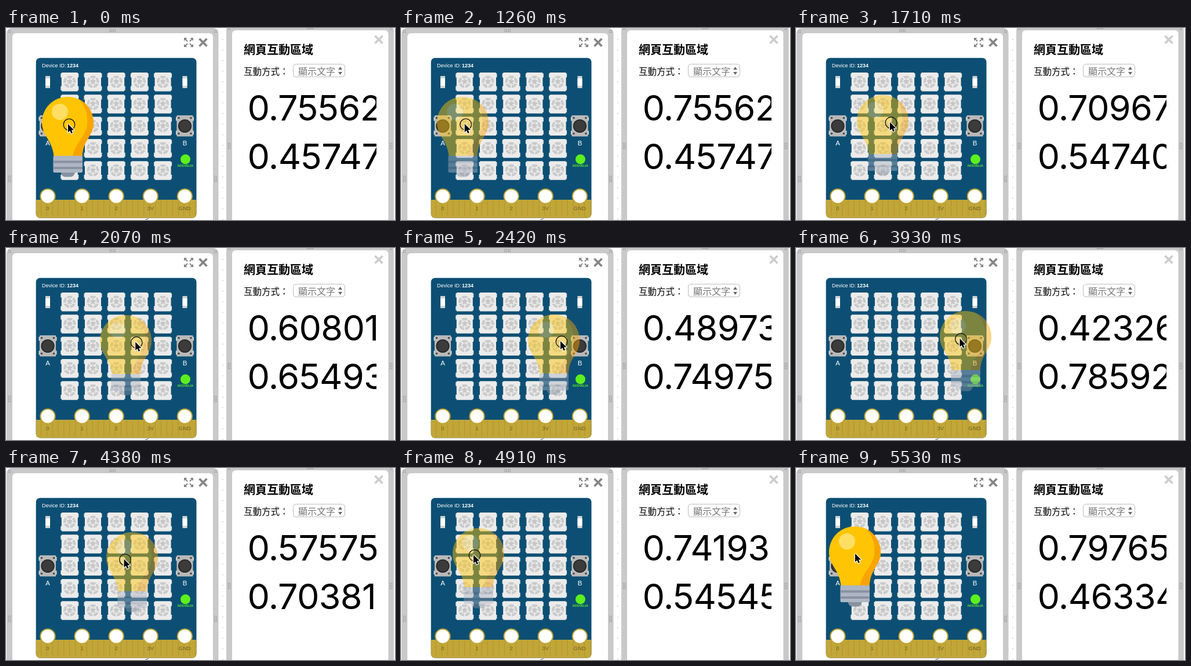
An HTML page with a canvas for the animation above (5710 ms loop, 671 by 332 pixels).

```html
<!DOCTYPE html>
<html lang="zh-Hant">
<head>
<meta charset="utf-8">
<title>Bulb drag</title>
<style>
html, body { margin: 0; width: 100%; height: 100%; overflow: hidden; background: #fff; }
canvas { display: block; }
</style>
</head>
<body>
<canvas id="stage" width="671" height="332"></canvas>
<script>
const W = 671, H = 332, LOOP = 5710, TICK = 89.3;
const BLUE = '#0d4f74', GOLD = '#c1a638', FRAME = '#c9c9c9';
const SANS = '"Liberation Sans", sans-serif';
const CJK = '"Noto Sans CJK TC", "Noto Sans CJK JP", "Noto Sans CJK", sans-serif';
const GRAB = [47, 48];

// Waypoints of the drag: tick, bulb x, bulb y, two 10-bit sensor levels
const PATH = [
  [14, 62, 119, 773, 468],
  [19, 105, 116, 726, 560],
  [27, 219, 115, 501, 767],
  [31, 252, 109, 425, 808],
  [43, 252, 109, 425, 808],
  [49, 173, 111, 589, 720],
  [55, 89, 104, 759, 558],
  [60, 57, 101, 816, 474]
];

function layer(w, h, paint) {
  const canvas = document.createElement('canvas');
  canvas.width = w;
  canvas.height = h;
  paint(canvas.getContext('2d'));
  return canvas;
}

function box(c, x, y, w, h, fill, r = 0) {
  c.fillStyle = fill;
  c.beginPath();
  c.roundRect(x, y, w, h, r);
  c.fill();
}

function disc(c, x, y, r, fill) {
  c.fillStyle = fill;
  c.beginPath();
  c.arc(x, y, r, 0, Math.PI * 2);
  c.fill();
}

function ring(c, x, y, r, color, width) {
  c.strokeStyle = color;
  c.lineWidth = width;
  c.beginPath();
  c.arc(x, y, r, 0, Math.PI * 2);
  c.stroke();
}

function line(c, points, color, width) {
  c.strokeStyle = color;
  c.lineWidth = width;
  c.beginPath();
  points.forEach(([x, y]) => c.lineTo(x, y));
  c.stroke();
}

function poly(c, points, fill) {
  c.fillStyle = fill;
  c.beginPath();
  points.forEach(([x, y]) => c.lineTo(x, y));
  c.closePath();
  c.fill();
}

function text(c, str, x, y, font, fill, align = 'left') {
  c.font = font;
  c.fillStyle = fill;
  c.textAlign = align;
  c.fillText(str, x, y);
}

// Calls fn with the signs of the four corners
function corners(fn) {
  for (const sx of [-1, 1])
    for (const sy of [-1, 1]) fn(sx, sy);
}

function grip(c, x, y, cols, rows) {
  for (let i = 0; i < cols; i++)
    for (let j = 0; j < rows; j++)
      box(c, x + (i - (cols - 1) / 2) * 3 - 0.75, y + (j - (rows - 1) / 2) * 3 - 0.75, 1.5, 1.5, '#8c8c8c');
}

function panel(c, x, y, w, side, midY) {
  box(c, x, y, w, 360, FRAME, 9);
  box(c, x + side, y + 9, w - side * 2 + 0.5, 360, '#fff', 6);
  grip(c, x + w / 2, y + 4.5, 4, 2);
  for (const gx of [x + 5, x + w - 5]) {
    grip(c, gx, midY, 2, 4);
    grip(c, gx, y + 6, 2, 2);
  }
}

function cross(c, x, y, color) {
  const r = 6.5;
  line(c, [[x - r, y - r], [x + r, y + r]], color, 3.8);
  line(c, [[x - r, y + r], [x + r, y - r]], color, 3.8);
}

function expandIcon(c, x, y) {
  corners((sx, sy) => {
    const at = (a, b) => [x + sx * a, y + sy * b];
    poly(c, [at(8, 8), at(8, 2.5), at(2.5, 8)], '#858585');
    line(c, [at(2, 2), at(6, 6)], '#858585', 2);
  });
}

function panels(c) {
  box(c, 0, 0, W, H, '#fff');
  for (let y = 19; y < H; y += 18.3) box(c, 373, y, 1.5, 1.5, '#c4c4c4');
  panel(c, 1, 0, 365.5, 10, 261);
  panel(c, 380, -5, 289, 10, 204);
  expandIcon(c, 315, 25);
  cross(c, 340, 25, '#868686');
  cross(c, 643, 20, '#cccccc');

  text(c, '網頁互動區域', 410, 45, 'bold 20px ' + CJK, '#000');
  text(c, '互動方式：', 410, 80.5, '15.5px ' + CJK, '#000');
  box(c, 495, 62, 90, 23, '#bdbdbd', 5.5);
  box(c, 496, 63, 88, 21, '#fff', 4.5);
  text(c, '顯示文字', 504, 80.5, '16px ' + CJK, '#777');
  for (const s of [-1, 1])
    poly(c, [[576.5, 74 + s * 7], [580, 74 + s * 2], [573, 74 + s * 2]], '#666');
}

function led(c, x, y) {
  corners((sx, sy) => box(c, x + sx * 13 - 2.5, y + sy * 11 - 3.5, 5, 7, '#e4e5e6', 0.5));
  box(c, x - 14, y - 16, 28, 32.5, '#ebebeb', 1);
  disc(c, x, y, 12, '#f3f3f3');
  disc(c, x, y, 10.8, '#cbcbcb');
  for (let i = 0; i < 5; i++) {
    const a = Math.PI * (0.5 + i * 0.4);
    line(c, [[x, y], [x + 11 * Math.cos(a), y + 11 * Math.sin(a)]], '#eee', 1.8);
  }
  ring(c, x, y, 5.6, '#eee', 1.2);
  poly(c, [[x - 3.5, y - 3], [x + 3.5, y - 3], [x + 2, y + 3], [x - 2, y + 3]], '#c6c6c6');
}

function button(c, x, y, label) {
  corners((sx, sy) => box(c, x + sx * 13.5 - 2, y + sy * 12 - 3.5, 4, 7, '#d5d5d5', 1));
  box(c, x - 14, y - 18, 28, 36.5, '#b9b9b9', 1);
  corners((sx, sy) => disc(c, x + sx * 10.5, y + sy * 13.5, 1.8, '#4a4a4a'));
  disc(c, x, y + 0.5, 11.6, '#242424');
  disc(c, x, y + 0.5, 10, '#3b3b3b');
  text(c, label, x, y + 34, '11.5px ' + SANS, '#fff', 'center');
}

function board(c) {
  box(c, 51.7, 51.7, 276.8, 276.8, BLUE, 7);
  box(c, 51.7, 297, 276.8, 31.5, GOLD, [0, 0, 7, 7]);
  for (let x = 60; x < 326; x += 9.85) box(c, x, 298, 1, 27, '#b2942f');
  ['0', '1', '2', '3V', 'GND'].forEach((pin, i) => {
    const x = 72 + i * 59.1;
    disc(c, x, 291, 13.6, GOLD);
    disc(c, x, 291, 11.5, '#fff');
    text(c, pin, x, 315, '9.5px ' + SANS, '#6f6126', 'center');
  });
  text(c, 'Device ID:', 62, 68, '9px ' + SANS, '#fff');
  text(c, '1234', 105, 68, 'bold 9px ' + SANS, '#fff');
  for (let i = 0; i < 5; i++)
    for (let j = 0; j < 5; j++)
      led(c, 109.8 + i * 40.2, 93 + j * 38.3);
  [72, 308.5].forEach((x, i) => {
    box(c, x - 4, 83, 8, 21, '#cfd3d5');
    box(c, x - 4, 87, 8, 13, '#fff');
    button(c, x, 169, 'AB'[i]);
  });
  disc(c, 309.5, 227, 8.5, '#5cf01c');
  text(c, 'NODVELIA', 309.5, 239.5, 'bold 5.2px ' + SANS, '#5cf01c', 'center');
  line(c, [[240, 332], [246, 329.5]], '#777', 1.2);
}

function drawBulb(c) {
  const glass = new Path2D('M44.5 0C70 0 89 20 89 45C89 60 81 68 75 80C71 88 70 96 69.5 103H20.5C20 96 18 88 14 80C8 68 0 60 0 45C0 20 19 0 44.5 0Z');
  c.fillStyle = '#ffc505';
  c.fill(glass);
  c.save();
  c.clip(glass);
  c.fillStyle = '#f8a400';
  c.fill(new Path2D('M58 0C74 12 80 28 78 48C76 68 57 80 53 103H90V0Z'));
  c.restore();
  disc(c, 31, 26, 14, '#ffdf63');
  box(c, 19.5, 102, 50.5, 29, '#aeb6c3', 2);
  for (const y of [110.5, 121]) box(c, 19.5, y, 50.5, 4, '#8992a2');
  box(c, 33, 131, 23.5, 7.5, '#8791a1', [0, 0, 11, 11]);
}

function pointer(c, x, y, pressed) {
  if (pressed) ring(c, x, y, 9.8, '#111', 1.3);
  const arrow = [[0, 0], [0, 14.5], [3.3, 11.5], [5.5, 16.5], [8, 15.4], [5.9, 10.6], [10.3, 10.4]]
    .map(([a, b]) => [x - 2 + a, y - 1 + b]);
  c.lineJoin = 'round';
  line(c, [...arrow, arrow[0]], '#fff', 2.4);
  poly(c, arrow, '#000');
}

function slope(i, k) {
  const a = PATH[i], b = PATH[i + 1];
  return a && b ? (b[k] - a[k]) / (b[0] - a[0]) : 0;
}

// Harmonic mean of both slopes: smooth through a waypoint, still at a rest
function tangent(i, k) {
  const l = slope(i - 1, k), r = slope(i, k);
  return l * r > 0 ? 2 * l * r / (l + r) : 0;
}

// Cubic Hermite curve through the waypoints
function poseAt(tick) {
  const last = PATH.length - 1;
  const n = Math.min(Math.max(tick, PATH[0][0]), PATH[last][0]);
  const i = Math.max(0, PATH.findIndex(p => p[0] >= n) - 1);
  const a = PATH[i], b = PATH[i + 1], span = b[0] - a[0];
  const p = (n - a[0]) / span, q = 1 - p;
  return [1, 2, 3, 4].map(k =>
    a[k] * q * q * (1 + 2 * p) + b[k] * p * p * (3 - 2 * p) +
    span * p * q * (q * tangent(i, k) - p * tangent(i + 1, k)));
}

const back = layer(W, H, c => { panels(c); board(c); });
const bulb = layer(90, 140, drawBulb);
const stage = document.getElementById('stage').getContext('2d');

function draw(t) {
  const c = stage, n = Math.floor((t + 10) / TICK);
  const [x, y, ...levels] = poseAt(n);
  const [nextX, nextY] = poseAt(n + 1);
  const within = (from, to) => n >= from && n < to;
  const dragged = within(14, 34) || within(42, 62);
  const pressed = n === 0 || within(11, 33) || within(40, 61);

  c.drawImage(back, 0, 0);
  c.globalAlpha = dragged ? 0.46 : 1;
  c.drawImage(bulb, Math.round(x), Math.round(y));
  c.globalAlpha = 1;
  // The bulb trails the pointer by one tick
  pointer(c, nextX + GRAB[0], nextY + GRAB[1], pressed);

  c.save();
  c.beginPath();
  c.rect(400, 100, 239, 170);
  c.clip();
  c.letterSpacing = '-0.6px';
  levels.forEach((level, i) => {
    const reading = Math.round(level) / 1023;
    text(c, reading.toFixed(8), 416.5, 160 + i * 83.5, '400 61px Inter, sans-serif', '#000');
  });
  c.restore();
}

function frame() {
  draw(performance.now() % LOOP);
  requestAnimationFrame(frame);
}
frame();
</script>
</body>
</html>
```
